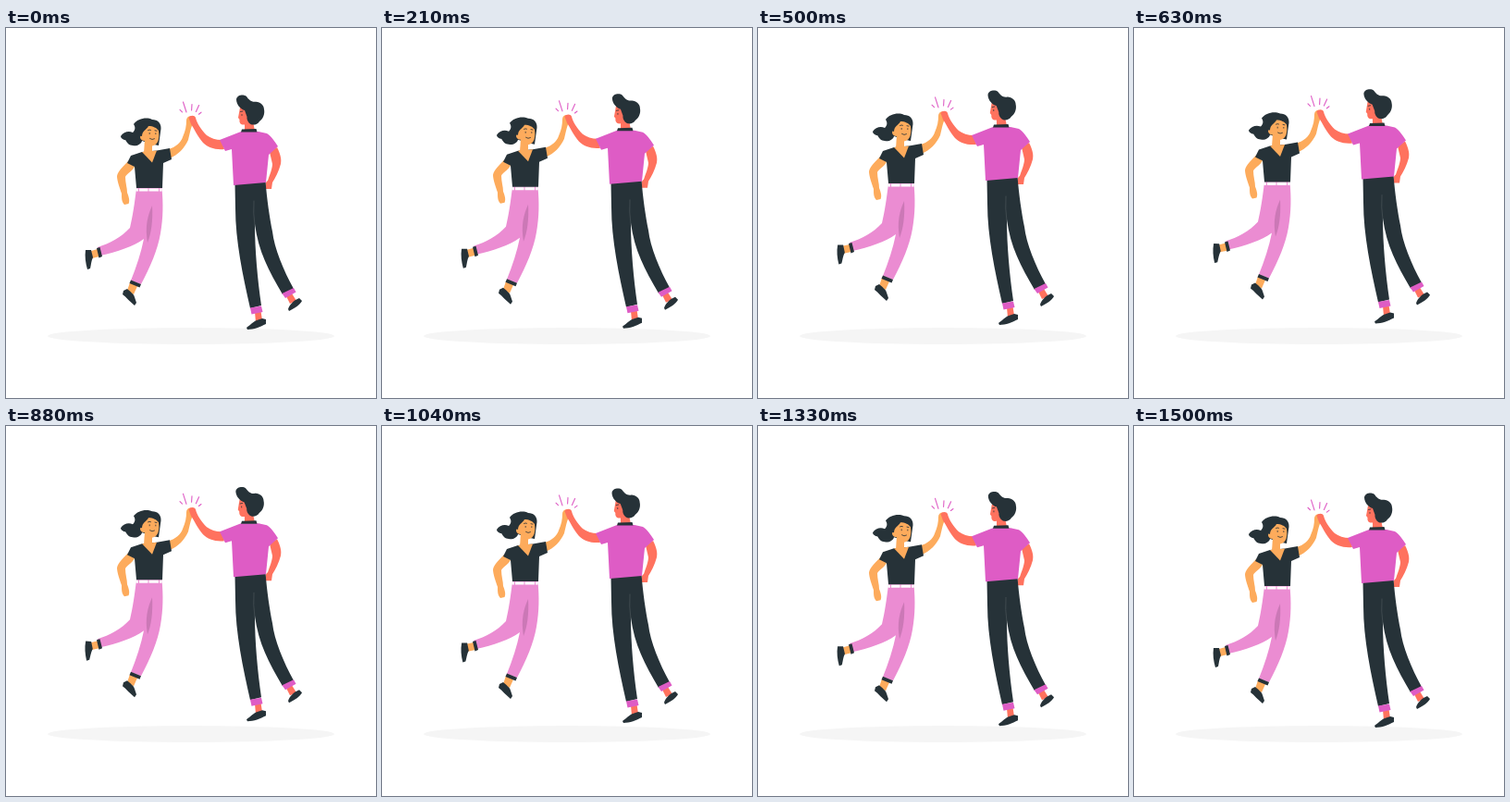
These frames come from a looping animation (400 by 400 pixels, 1540 ms). An HTML page:

```html
<!DOCTYPE html>
<html lang="en">
<head>
<meta charset="utf-8">
<title>High five</title>
<style>
  html, body { margin: 0; width: 100%; height: 100%; overflow: hidden; background: #fff; }
  svg { display: block; width: 100%; height: 100%; }
  .dark { fill: #263238; }
  .pink { fill: #de5cc5; }
  .rose { fill: #eb8cd2; }
  .tan { fill: #fdab5c; }
  .coral { fill: #ff725e; }
  .line { fill: none; stroke-linecap: round; stroke-linejoin: round; }
</style>
</head>
<body>
<svg viewBox="0 0 400 400">
  <ellipse cx="200" cy="333" rx="155" ry="9" fill="#f5f5f5"/>
  <g id="jump">
    <path class="line" stroke="#de5cc5" stroke-width="1.1" d="M191.5 80 195 91M201 82.5 200.6 89M208.6 83.5 205.4 90.5M188 88.3 190.5 90.8M211 91.2 208.4 93.2"/>

    <g id="woman">
      <path class="tan" d="M132 144 139 150C136 155 130 158 129 161C129 167 131 173 131 178C133 183 134 187 132.500 190L128 191C125 188 125 184 125 179C123 173 120 165 120 160C121 155 127 149 132 144Z"/>
      <path class="tan" d="M176 131C183 129 189 124 191 118C194 111 195 106 195 100C195 96 199 94 202 96L203 102C200 106 199 113 197 121C193 130 186 137 177 141Z"/>

      <g id="foot">
        <path class="tan" d="M92 241 99 239 101 247 93 249Z"/>
        <path class="dark" d="M86 240 92 240 94 248C92 252 92 256 91 260L88 261C86 254 85 247 86 240Z"/>
      </g>
      <path class="tan" d="M134 275 142 279 138 288 131 284Z"/>
      <path class="dark" d="M127 284 131 282C134 285 138 287 139 291L141 297 139 300C134 296 130 291 126 288Z"/>
      <path class="rose" d="M141 173H168.500C170 190 170 205 167 222C164 240 156 258 146 277L135 273C141 258 146 243 149 228C138 236 120 242 102 246L99 237C112 233 125 226 134 216C137 203 139 190 141 173Z"/>
      <path fill="#cb78b6" d="M158 192C153 203 150 215 153 232C157 222 159 208 158 192Z"/>
      <path class="dark" d="M98 238 101.500 237 104 247 100.500 248.500ZM135 272.500 146 277 144.500 280.500 133.500 276Z"/>
      <path fill="#fff" d="M140.500 173.500H168.700V176.500H140.300Z"/>
      <path class="line" stroke="#eb8cd2" d="M143.500 173V177M154 173V177M165.500 173V177"/>

      <path class="dark" d="M135 138 147 134 163 132.500 177 130 179 142 170 146 169 173H141L139 150 131 146Z"/>
      <path class="tan" d="M147 134 163 132.500 158 145.500Z"/>

      <path class="dark" d="M138 104C142 98 152 96 158 99C164 99 168 103 167.500 109L165 127 160 126 147 122C146 126 141 128 137 127C133 127 131 124 129 121C127 121 124 119 124 117C127 112 133 111 137 113C140 110 140 107 138 104Z"/>
      <path class="tan" d="M150 121H158V135H149Z"/>
      <path class="tan" d="M147 117C147 111 152 110 154 106C159 106 163 108 165 111C166 119 165 126 158 127.500C154 128 151 125 150 122C147 122 145 120 145 118Q145 116 147 117Z"/>
      <path class="line" stroke="#263238" stroke-width=".8" d="M153.500 110.500Q155 109.500 156.500 110.300M161 110.800 163 111.200M155.200 113.500V114.500M161.800 113.800V114.600M155.500 119.500Q158 121.500 160.500 119.800"/>
    </g>

    <g id="man">
      <path class="coral" d="M285 134 293 129C297 137 298 142 297 147C295 155 291 162 288 167L287 174 281 174C280 171 280 167 283 165C285 159 288 152 288 147Z"/>
      <path class="coral" d="M269 307 275.500 306 277 316 270 318ZM303 290 309 287 314 295 307 298Z"/>
      <path class="dark" d="M260 324C264 321 268 317 271 316L277 314 281 315V320C275 323 268 326 261 326Z"/>
      <path class="dark" d="M305 304C306 300 310 296 313 294L317 292 320 295C318 299 312 303 306 306Z"/>
      <path class="dark" d="M247.500 168 280.500 165C282 185 285 205 288 220C290 238 300 262 311 282L299 288C284 262 273 242 269 212C269 240 272 272 276 300L264 303C256 268 248 230 248 195Z"/>
      <path class="line" stroke="#4b5559" stroke-width=".7" d="M268 187Q267 200 269 214"/>
      <path class="pink" d="M264 302.500 276 300.500 277.500 307 265.500 309.500ZM298.500 287 311 281 313.500 285.500 302 292Z"/>

      <path class="coral" d="M197.500 97C199 94 204 94 205 97C206 102 211 110 217 116C221 119 227 121 233 121L236 131C226 132 218 129 213 124C207 117 203 108 200 104Z"/>
      <path class="pink" d="M231 121 254 112H273L282 114C286 116 290 122 294 128L284 137 281 167 246 170 244 131 237 133Z"/>

      <g id="head">
        <path class="coral" d="M253 86 264 86 269 111H258L258 104.500C254 105 252 103 252.500 99L251 97Z"/>
        <path class="dark" d="M249 77C250 72 257 71.500 260 74C262 77 265 80 269 79.800C274 79 279 83 279 88C280 93 278 98 274 101C272 104 269 105 266 104.500C263 104 260 100 260.500 96L258 89C254 88 249 83 249 77Z"/>
        <path class="line" stroke="#263238" stroke-width=".8" d="M253.500 90.500 256 90M255 93.500V94.500"/>
      </g>
      <path class="dark" d="M255 109.500 270.500 109 271.500 112.500H254Z"/>
    </g>
  </g>
</svg>
<script>
  const LOOP = 1540, STEPS = 37, LIFT = 7;
  const part = id => document.getElementById(id);
  const jump = part('jump'), head = part('head'), foot = part('foot');

  function draw(now) {
    const step = Math.floor((now % LOOP) / LOOP * STEPS);
    const rise = (1 - Math.cos(2 * Math.PI * step / STEPS)) / 2;
    jump.setAttribute('transform', `translate(0 ${-LIFT * rise})`);
    head.setAttribute('transform', `rotate(${-1.2 * rise} 263 110)`);
    foot.setAttribute('transform', `rotate(${3 * rise} 100 243)`);
    requestAnimationFrame(() => draw(performance.now()));
  }
  draw(performance.now());
</script>
</body>
</html>
```
